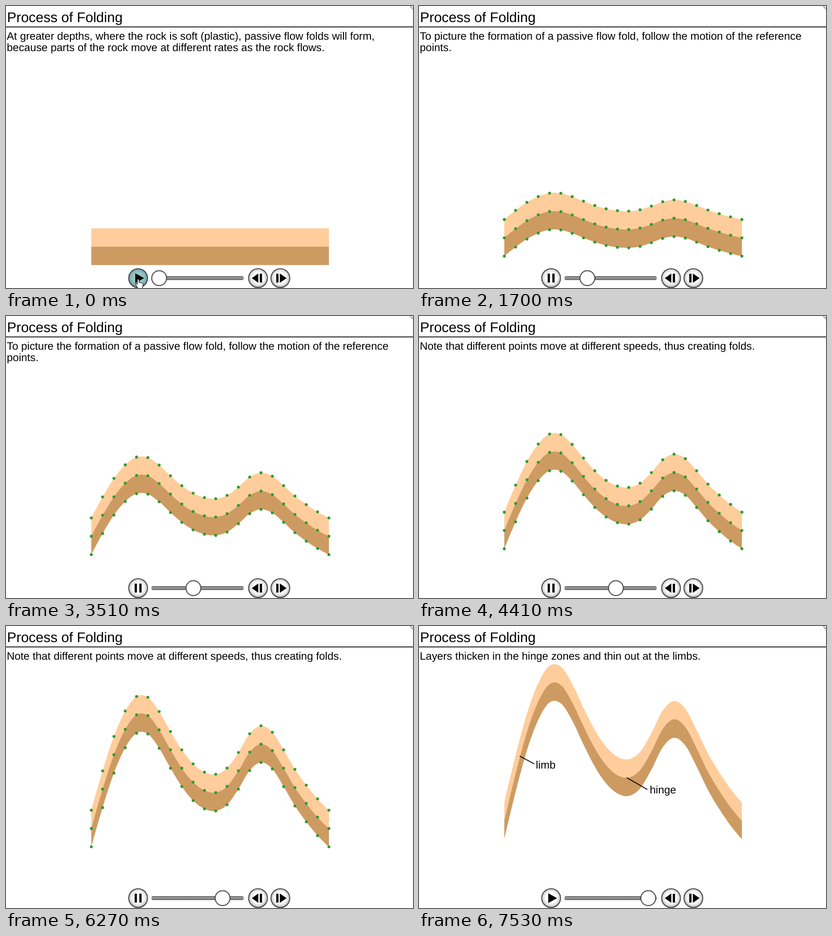
An HTML page for the animation above (9.06 s loop, 784 by 544 pixels).

```html
<!DOCTYPE html>
<html lang="en">
<head>
<meta charset="utf-8">
<title>Process of Folding</title>
<style>
html, body { margin: 0; width: 100%; height: 100%; overflow: hidden; background: #fff; }
svg { display: block; }
text { font: 20.8px "Liberation Sans", Arial, sans-serif; text-rendering: geometricPrecision; }
.title { font-size: 26.9px; }
.lead { stroke: #000; stroke-width: 1.6; }
</style>
</head>
<body>
<svg width="784" height="544" viewBox="0 0 784 544">
  <defs>
    <radialGradient id="face" cx=".5" cy=".48" r=".52">
      <stop offset=".55" stop-color="#fff"/>
      <stop offset=".8" stop-color="#dedede"/>
      <stop offset="1" stop-color="#929292"/>
    </radialGradient>
    <radialGradient id="hover" cx=".5" cy=".48" r=".52">
      <stop offset=".55" stop-color="#93c6c7"/>
      <stop offset=".8" stop-color="#82b0b1"/>
      <stop offset="1" stop-color="#567576"/>
    </radialGradient>
    <radialGradient id="ball">
      <stop offset=".78" stop-color="#fff"/>
      <stop offset="1" stop-color="#cfcfcf"/>
    </radialGradient>
    <linearGradient id="groove" x2="0" y2="1">
      <stop offset="0" stop-color="#4c4c4c"/>
      <stop offset=".45" stop-color="#a8a8a8"/>
      <stop offset="1" stop-color="#4c4c4c"/>
    </linearGradient>
  </defs>
  <rect width="784" height="544" fill="#fff"/>
  <path d="M778.5-1Q781 4 785 6" fill="none" stroke="#aaa" stroke-width="2.5"/>
  <text class="title" x="2" y="31">Process of Folding</text>
  <rect y="39.6" width="784" height="1.6"/>
  <text id="line1" x="1.5" y="65"></text>
  <text id="line2" x="1.5" y="87"></text>

  <path id="upper" fill="#ffcd9b"/>
  <path id="lower" fill="#cd9b62"/>
  <g id="dots" fill="#2b9c30"></g>
  <g id="labels">
    <path class="lead" d="M194 251L222 266M400 292.5L440 315.5"/>
    <text x="225" y="275">limb</text>
    <text x="444.5" y="322.5">hinge</text>
  </g>

  <g stroke="#3a3a3a" stroke-width="1.6" fill="url(#face)">
    <circle id="button" cx="254.5" cy="525" r="18.2"/>
    <circle cx="485.5" cy="525" r="18.2"/>
    <circle cx="528.5" cy="525" r="18.2"/>
  </g>
  <path id="icon"/>
  <path d="M486 516V534L473.5 525ZM488.8 516.5h4.4v17h-4.4ZM520.5 516.5h4.4v17h-4.4ZM527.5 516V534L540.5 525Z"/>
  <rect x="280" y="521.3" width="178" height="7.2" rx="3.6" fill="url(#groove)"/>
  <circle id="knob" cy="525" r="14.4" fill="url(#ball)" stroke="#333" stroke-width="1.5"/>
  <path id="hand" d="M253 528q1.6-2.4 3.2 0v5.5q1.5-1.2 2.8.4q1.5-.8 2.5.6q1.8-.6 2.4 1.2v4l-1.6 5h-8l-4.6-7.5q-.8-2.2 1.2-2l2.1 2Z" fill="#fff" stroke="#000"/>
</svg>
<script>
const LOOP = 9060, START = 260, STEP = 60, LAST = 122;
const X0 = 164.3, DX = 21.795, TOP = 429, THICK = 35.35;
// rise of each reference point after 99 steps
const RISE = [73.7, 149.5, 216, 265, 293, 291.5, 264, 225.5, 190, 163, 147,
  143, 155, 185, 221, 236.5, 224, 190, 152.5, 122, 95.5, 73.7];
const N = RISE.length;
const TEXTS = [
  ["At greater depths, where the rock is soft (plastic), passive flow folds will form,",
   "because parts of the rock move at different rates as the rock flows."],
  ["To picture the formation of a passive flow fold, follow the motion of the reference", "points."],
  ["Note that different points move at different speeds, thus creating folds.", ""],
  ["Layers thicken in the hinge zones and thin out at the limbs.", ""]
];
const PLAY = "M249 515.5V534.5L266 525Z";
const PAUSE = "M247.8 516.2h4.4v17.4h-4.4ZM256.8 516.2h4.4v17.4h-4.4Z";

const $ = id => document.getElementById(id);
const set = (id, name, value) => $(id).setAttribute(name, value);
const show = (id, on) => set(id, "visibility", on ? "visible" : "hidden");
const px = i => X0 + i * DX;

function rise(i) {
  if (i < 0) return 3 * RISE[0] - 3 * RISE[1] + RISE[2];
  if (i >= N) return 3 * RISE[N - 1] - 3 * RISE[N - 2] + RISE[N - 3];
  return RISE[i];
}

// Catmull-Rom curve through the points, in either direction
function edge(scale, base, dir) {
  const y = i => base - rise(i) * scale;
  const pt = (x, v) => x.toFixed(2) + " " + v.toFixed(2);
  let i = dir > 0 ? 0 : N - 1, d = pt(px(i), y(i));
  for (let k = 1; k < N; k++, i += dir) {
    const j = i + dir;
    d += "C" + pt(px(i) + dir * DX / 3, y(i) + (y(j) - y(i - dir)) / 6) +
      " " + pt(px(j) - dir * DX / 3, y(j) - (y(j + dir) - y(i)) / 6) +
      " " + pt(px(j), y(j));
  }
  return d;
}

const band = (scale, top, bottom) =>
  "M" + edge(scale, top, 1) + "L" + edge(scale, bottom, -1) + "Z";

const dots = [];
for (let i = 0; i < 3 * N; i++) {
  const c = document.createElementNS("http://www.w3.org/2000/svg", "circle");
  c.setAttribute("r", 2.8);
  c.setAttribute("cx", px(i % N));
  dots.push($("dots").appendChild(c));
}

function stepAt(t) {
  if (t < START) return 0;
  // one short hold, then the steps run 10 ms later
  if (t < 3450) return Math.min(52, Math.floor((t - START) / STEP) + 1);
  return Math.min(LAST, Math.floor((t - START - 10) / STEP) + 1);
}

let shown = -1;
function draw(t) {
  const n = stepAt(t);
  if (n === shown) return;
  shown = n;
  const idle = n === 0, done = n === LAST;
  const scale = Math.min(119, Math.max(0, n - 2)) / 99;
  const lines = TEXTS[idle ? 0 : done ? 3 : n >= 61 ? 2 : 1];
  $("line1").textContent = lines[0];
  $("line2").textContent = lines[1];
  set("upper", "d", band(scale, TOP, TOP + THICK + .4));
  set("lower", "d", band(scale, TOP + THICK, TOP + 2 * THICK));
  dots.forEach((c, i) =>
    c.setAttribute("cy", TOP + Math.floor(i / N) * THICK - RISE[i % N] * scale));
  show("dots", !idle && !done);
  show("labels", done);
  show("hand", idle);
  set("button", "fill", idle ? "url(#hover)" : "url(#face)");
  set("icon", "d", idle || done ? PLAY : PAUSE);
  set("knob", "cx", 295 + 1.222 * Math.min(120, Math.max(0, n - 1)));
}

const began = performance.now();
function tick() {
  draw((performance.now() - began) % LOOP);
  requestAnimationFrame(tick);
}
tick();
</script>
</body>
</html>
```
